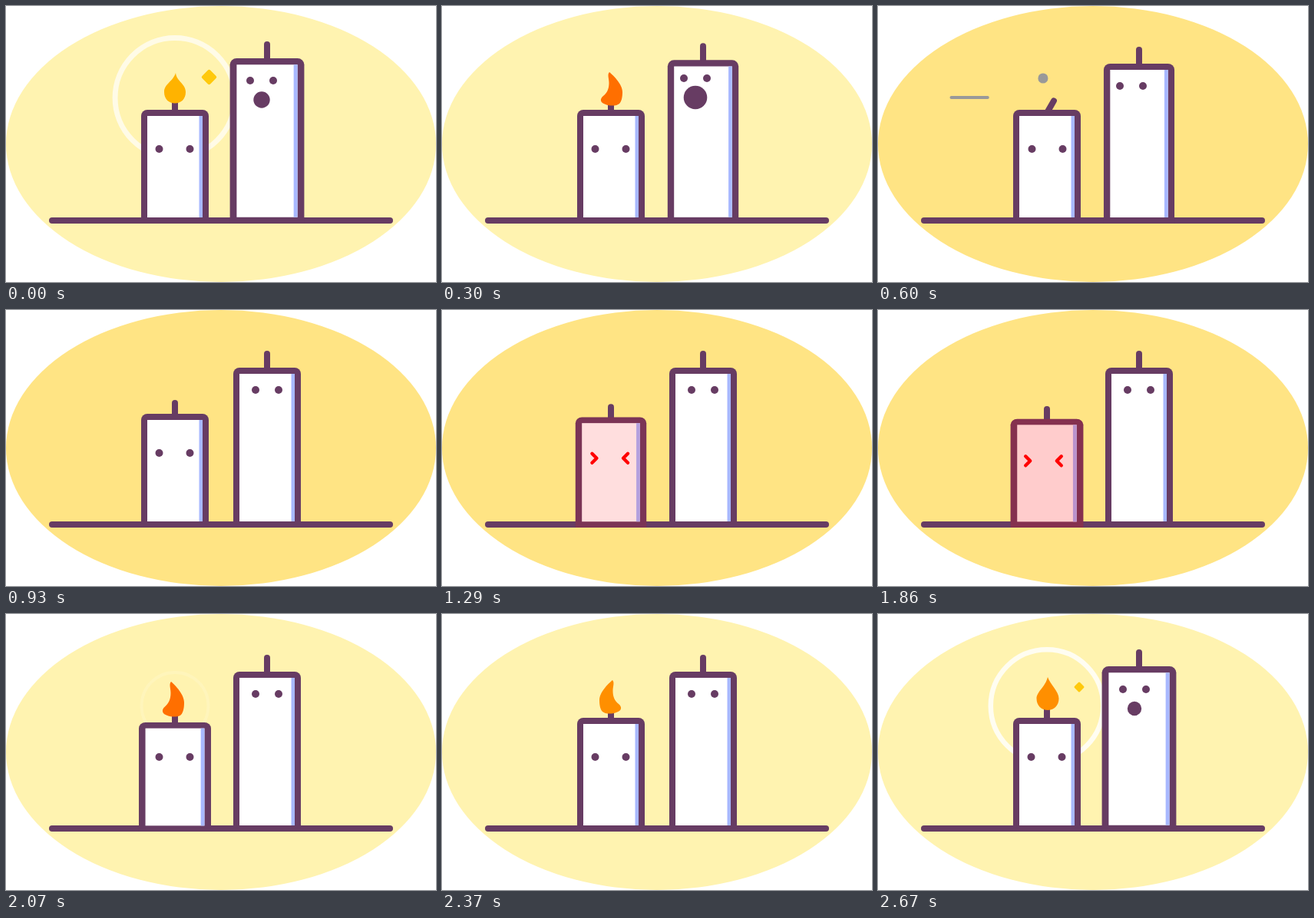
Recreate the animation shown at these times as an HTML page with a canvas. Size 560 px wide and 359 px high, loop 2700 ms.

```html
<!DOCTYPE html>
<html lang="en">
<head>
<meta charset="utf-8">
<title>Two candles</title>
<style>
  html, body { margin: 0; width: 100%; height: 100%; overflow: hidden; background: #fff; }
  canvas { display: block; width: 560px; height: 359px; }
</style>
</head>
<body>
<canvas id="stage"></canvas>
<script>
const LOOP = 2700;
const INK = '#673c63';
const canvas = document.getElementById('stage');
const ratio = window.devicePixelRatio || 1;
canvas.width = Math.round(560 * ratio);
canvas.height = Math.round(359 * ratio);
const ctx = canvas.getContext('2d');

// Times run from 1000 to 3700, so the lit phase is one unbroken span.
const STRAIN = 1110, RELEASE = 1830, LIGHT_ON = 1920, LOOK = 2490;
const BLOW = 2940, LIGHT_OFF = 3120;
const RINGS = [2034, 2446];

const ramp = (t, start, span) => Math.min(1, Math.max(0, (t - start) / span));
const bump = (t, start, rise, end, fall) => ramp(t, start, rise) - ramp(t, end, fall);
const easeOut = u => u * (2 - u);
const mix = (a, b, u) => a + (b - a) * u;

// Oscillation that fades to rest over the span.
function spring(t, start, span, cycles, phase = 0) {
  const u = ramp(t, start, span);
  return (1 - u) * Math.cos(2 * Math.PI * cycles * u - phase);
}

function dot(x, y, r, color = INK) {
  if (r <= 0) return;
  ctx.fillStyle = color;
  ctx.beginPath();
  ctx.arc(x, y, r, 0, Math.PI * 2);
  ctx.fill();
}

function line(points, width, color = INK) {
  ctx.strokeStyle = color;
  ctx.lineWidth = width;
  ctx.lineCap = ctx.lineJoin = 'round';
  ctx.beginPath();
  points.forEach(([x, y]) => ctx.lineTo(x, y));
  ctx.stroke();
}

// An 88 wide candle, scaled from the middle of its foot.
function body(cx, height, sx, sy, heat = 0) {
  const shell = new Path2D();
  shell.roundRect(-44, -height, 88, height, [8, 8, 0, 0]);
  ctx.save();
  ctx.translate(cx, 283);
  ctx.scale(sx, sy);
  ctx.fillStyle = INK;
  ctx.fill(shell);
  ctx.fillStyle = '#fff';
  ctx.fillRect(-36, 8 - height, 72, height - 16);
  ctx.fillStyle = '#a8b8ff';
  ctx.fillRect(31.5, 8 - height, 4.5, height - 16);
  ctx.fillStyle = `rgba(255,0,0,${0.3 * heat})`;
  ctx.fill(shell);
  ctx.restore();
}

const drop = new Path2D('M221 82C224 91 235.5 101 235.5 110C235.5 119 229 125 221 125C213 125 206.5 119 206.5 110C206.5 101 218 95 221 82Z');
const bent = new Path2D('M221 87C222 98 234 101 234 112C234 121 228 126.5 220 126.5C212 126.5 206 121 206 112C206 101 217 99 221 87Z');
const swirl = new Path2D('M218 86C224 91 235 102 235 112C235 118 234 124 231 127C228 130 219 130.5 213 128C206 126 205 121 210 117C215 113 217.5 108 217.5 100C217.5 94 215 89 218 86Z');
const FLAMES = [
  [bent, '#ffb300', 1],
  [swirl, '#ff6f00', 1],
  [swirl, '#ff8f00', -1],
  [drop, '#ff8f00', 1]
];

function flame(t, sink) {
  const size = bump(t, LIGHT_ON, 60, LIGHT_OFF - 60, 60);
  if (size <= 0) return;
  const [path, color, side] = FLAMES[Math.floor(t / 60 + 3) % 4];
  ctx.save();
  ctx.translate(220 - sink * 0.5, 130 + sink * 0.67);
  ctx.scale(size * side, size * (1 + sink * 0.008));
  ctx.translate(-220, -130);
  ctx.fillStyle = color;
  ctx.fill(path);
  ctx.restore();
}

function ring(t) {
  for (const start of RINGS) {
    const outer = 39.5 + (t - start) * 0.165;
    if (outer < 39.5 || outer > 92) continue;
    const width = outer * 0.085;
    const alpha = 0.82 * ramp(outer, 40, 32) - 0.5 * ramp(outer, 78, 14);
    ctx.strokeStyle = `rgba(255,255,255,${alpha})`;
    ctx.lineWidth = width;
    ctx.beginPath();
    ctx.arc(220, 119.5, outer - width / 2, 0, Math.PI * 2);
    ctx.stroke();
  }
}

function sparkle(t) {
  const p = ramp(t, 2610, 240);
  const half = 20 * Math.min(p, 1 - p);
  ctx.save();
  ctx.translate(257 + 20 * p, 100 - 20 * p);
  ctx.rotate(Math.PI / 4);
  ctx.fillStyle = '#ffc90d';
  ctx.beginPath();
  ctx.roundRect(-half, -half, half * 2, half * 2, half * 0.3);
  ctx.fill();
  ctx.restore();
}

function smoke(t) {
  const gray = '#999';
  const puff = ramp(t, 3150, 240);
  if (puff > 0 && puff < 1) {
    const head = mix(190, 80, easeOut(puff));
    const tail = mix(190, 80, puff ** 1.8);
    line([[head, 119], [tail, 119]], 4, gray);
  }
  const rise = ramp(t, 3180, 330);
  dot(220 - 14 * rise, 118 - 66 * rise, 7.2 * Math.sin(Math.PI * rise), gray);
}

function tallCandle(t) {
  const inhale = bump(t, LOOK - 60, 240, BLOW, 120);
  const recoil = bump(t, 3180, 90, 3270, 90);
  const lift = 7 * bump(t, LOOK - 60, 240, BLOW, 180);
  line([[340, 57 - lift], [340, 79 - lift]], 8);
  body(340, 208, 1 + 0.1 * inhale + 0.07 * recoil, 1 + lift / 208);

  const look = ramp(t, LOOK, 300);
  const blow = ramp(t, 3000, 180);
  const eyeX = 325 - 10 * (look - ramp(t, 3480, 150));
  const eyeY = 104 - 10 * (look - ramp(t, 3000, 120));
  dot(eyeX, eyeY, 5);
  dot(eyeX + 30, eyeY, 5);
  dot(340 - 10 * (look + blow), 129 - 10 * look, 15.3 * (look - blow));
}

function shortCandle(t) {
  const strain = easeOut(ramp(t, STRAIN, RELEASE - STRAIN));
  const squash = strain * spring(t, RELEASE, 600, 2.5);
  const heat = strain - ramp(t, RELEASE, 90);
  const tilt = 34 * spring(t, 3255, 360, 2, Math.PI / 2);
  const sink = 10 * squash;

  ctx.save();
  ctx.translate(220, 139 + sink);
  ctx.rotate(tilt * Math.PI / 180);
  line([[0, 0], [0, -18 + 2 * Math.max(0, squash)]], 8);
  ctx.restore();
  body(220, 148, 1 + 0.114 * squash, 1 - sink / 148, Math.max(0, heat));

  if (strain > 0 && t < RELEASE + 60) {
    const x = 219.5 - 4 * strain ** 2;
    const y = 186 + 10.3 * Math.sqrt(strain);
    for (const side of [-1, 1]) {
      const cx = x + side * 20.3;
      line([[cx + side * 3, y - 6], [cx - side * 3, y], [cx + side * 3, y + 6]], 4.4, '#f00');
    }
  } else {
    const nudge = bump(t, 3180, 120, 3300, 90);
    dot(199.5 + nudge, 186, 5);
    dot(239.5 + nudge, 186, 5);
  }
  flame(t, sink);
}

function draw(time) {
  const t = time < 1000 ? time + LOOP : time;
  const lit = t >= LIGHT_ON && t < LIGHT_OFF;
  ctx.setTransform(ratio, 0, 0, ratio, 0, 0);
  ctx.fillStyle = '#fff';
  ctx.fillRect(0, 0, 560, 359);
  ctx.fillStyle = lit ? '#fff3b0' : '#ffe484';
  ctx.beginPath();
  ctx.ellipse(280, 179.5, 280, 179.5, 0, 0, Math.PI * 2);
  ctx.fill();
  ring(t);
  line([[60, 279], [500, 279]], 8);
  tallCandle(t);
  shortCandle(t);
  sparkle(t);
  smoke(t);
}

let begin;
function tick(now) {
  if (begin === undefined) begin = now;
  draw((now - begin) % LOOP);
  requestAnimationFrame(tick);
}
draw(0);
requestAnimationFrame(tick);
</script>
</body>
</html>
```
